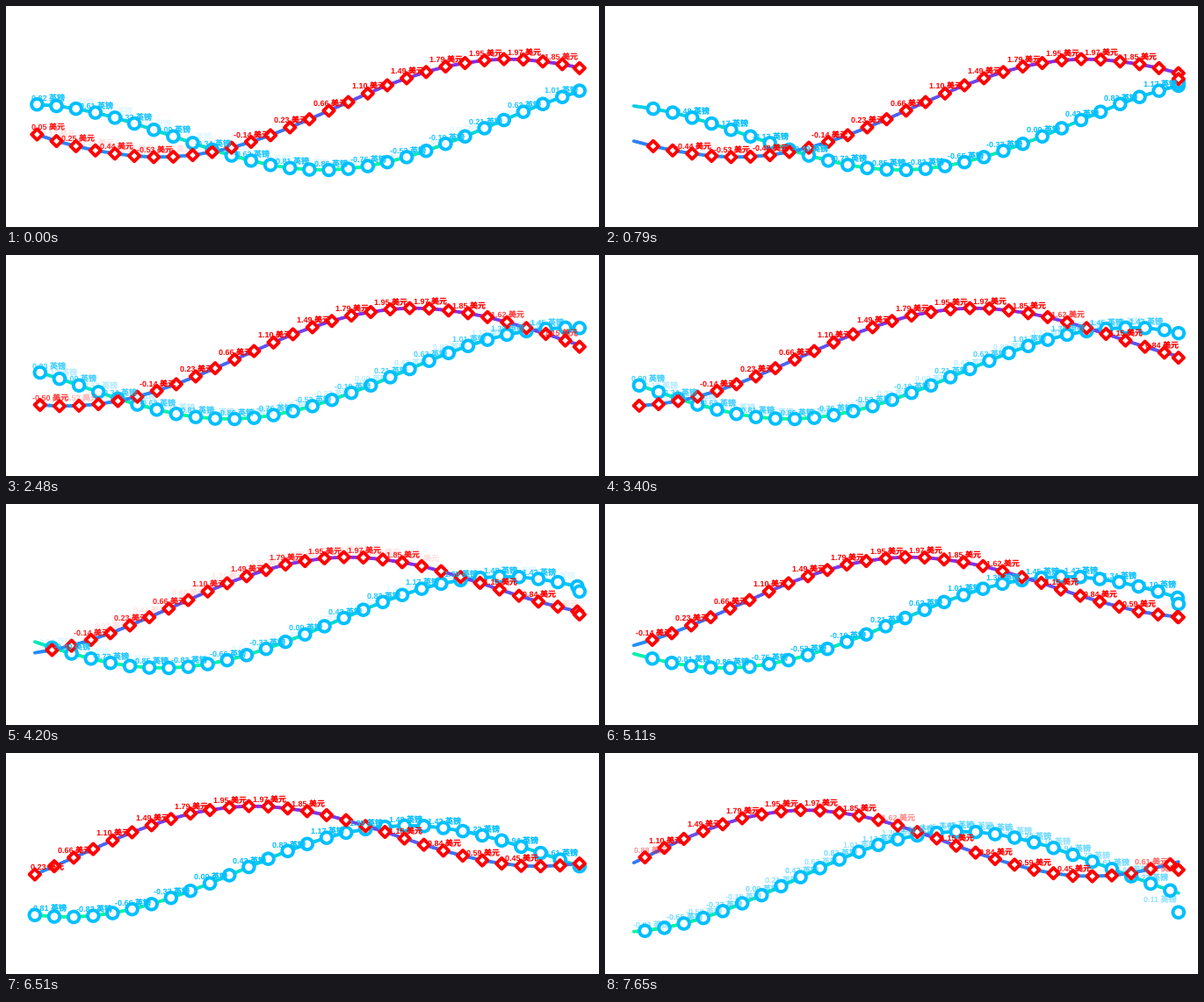
A matplotlib script for the animation above (7.75 s loop, 675 by 252 pixels).

```python
import numpy as np
import matplotlib.pyplot as plt
from matplotlib.animation import FuncAnimation
from matplotlib.collections import LineCollection

plt.rcParams["text.hinting"] = "none"

W, H, DPI = 675, 252, 100
PX = 72 / DPI
LEFT, RIGHT, COUNT = 32.8, 652.8, 29
STEP = (RIGHT - LEFT) / (COUNT - 1)
TICK, LOOP = 25, 7750

# Smooth curves through a few key points; index -1 leaves as the loop begins.
INDEX = np.arange(-1, 45)
KEYS = [0, 3, 7, 11, 15, 19, 23, 27, 32, 36, 40, 42, 44]
POUNDS = [.82, .61, 0, -.62, -.86, -.53, .21, 1.01, 1.48, 1.23, .61, .27, -.03]
DOLLARS = [.05, -.36, -.52, -.14, .66, 1.49, 1.95, 1.85, 1.15, .60, .45, .61, .85]

# Update count over time in ms; one unit is one new data point.
CLOCK = [0, 1420, 2480, 3400, 5110, 6510, 7650]
UPDATES = [-.327, 2.603, 4.593, 6.569, 10.232, 12.97, 15.475]

# The screen stutters regularly, holding a few pictures longer.
STALL_START, STALL_EVERY, STALL, HOLD = 540, 1940, 450, 150
LAST_PICTURE = 7650

# Axis as (zero line, pixels per unit); the last update rescales it.
AXIS, AXIS_END, RESCALE = np.array([148.7, 44.5]), np.array([180., 55.]), 16

LABEL_GAP = 12


def curve(values):
    return np.polynomial.Polynomial.fit(KEYS, values, 9)(INDEX).round(2)


def ease(p):
    return 4 * p ** 3 if p < .5 else 1 - 4 * (1 - p) ** 3


def screen_time(k):
    t = min(k * TICK + 10, LAST_PICTURE)
    since = (t - STALL_START) % STALL_EVERY
    return t - since % HOLD if since < STALL else t


def axis_at(shift):
    return AXIS_END if shift >= RESCALE else AXIS


def to_y(value, axis):
    return axis[0] - axis[1] * value


def label_width(value):
    return 41 if value < 0 else 38


def label_x(i, value, shift):
    """Label centre at rest, kept inside the plot."""
    half = label_width(value) / 2
    x = LEFT + STEP * (i - shift)
    return min(max(x, LEFT - 6 + half), RIGHT + 6 - half)


class Series:
    def __init__(self, ax, values, unit, color, high, low, marker, size, z):
        self.values = curve(values)
        self.high, self.low = np.array(high), np.array(low)
        self.line = LineCollection([], linewidths=3.8 * PX, zorder=z,
                                   capstyle="round")
        ax.add_collection(self.line)
        # One size per dot keeps their positions free of pixel snapping.
        self.dots = ax.scatter(np.zeros(COUNT), np.zeros(COUNT),
                               s=np.full(COUNT, (size * PX) ** 2),
                               marker=marker, facecolor="white",
                               edgecolor=color, linewidth=3.9 * PX,
                               zorder=z + 2)
        self.labels = [
            ax.text(0, 0, f"{v:.2f} {unit}", color=color, ha="center",
                    va="baseline", size=9 * PX, weight="bold", zorder=z + 4,
                    family=["Liberation Sans", "Noto Sans CJK JP"])
            for v in self.values]

    def draw_line(self, pos, axis):
        x = np.linspace(LEFT, RIGHT, 150)
        y = to_y(np.interp(pos + (x - LEFT) / STEP, INDEX, self.values), axis)
        pts = np.column_stack([x, y])
        t = ((y - y.min()) / np.ptp(y))[:-1, None]
        self.line.set_segments(np.stack([pts[:-1], pts[1:]], axis=1))
        self.line.set_color((self.high + (self.low - self.high) * t) / 255)

    def draw_dots(self, pos, axis, target):
        i = np.arange(target, target + COUNT)
        v = self.values[i + 1]
        x, y = LEFT + STEP * (i - pos), to_y(v, axis)
        # The newest point is put straight at its resting place.
        x[-1], y[-1] = RIGHT, to_y(v[-1], axis_at(target))
        self.dots.set_offsets(np.column_stack([x, y]))

    def draw_labels(self, e, axis, target, old, new):
        for i, v, label in zip(INDEX, self.values, self.labels):
            shown = target <= i < target + COUNT and (i in old or i in new)
            label.set_visible(bool(shown))
            if not shown:
                continue
            x, y = label_x(i, v, target), to_y(v, axis)
            if i >= target + COUNT - 2 and i not in old:
                y = to_y(v, axis_at(target))
            else:
                x0 = label_x(i, v, target - 1)
                x = x0 + (x - x0) * e
            label.set_position((x + 1, y - 5.2))
            label.set_alpha((1 - e) * (i in old) + e * (i in new))


fig = plt.figure(figsize=(W / DPI, H / DPI), dpi=DPI, facecolor="white")
ax = fig.add_axes([0, 0, 1, 1])
ax.set(xlim=(0, W), ylim=(H, 0))
ax.axis("off")

chart = [
    Series(ax, POUNDS, "英镑", "#00bfff", (0, 191, 255), (0, 250, 154),
           "o", 12.6, 1),
    Series(ax, DOLLARS, "美元", "#ff0000", (138, 43, 226), (30, 144, 255),
           "D", 8.7, 2),
]


def pick_labels(shift):
    """Keep each label that does not overlap one kept before it."""
    axis, boxes, kept = axis_at(shift), [], []
    for s in chart:
        chosen = set()
        for i in range(shift, shift + COUNT):
            v = s.values[i + 1]
            x, y, w = label_x(i, v, shift), to_y(v, axis), label_width(v)
            if all(abs(x - bx) >= (w + bw) / 2 or abs(y - by) >= LABEL_GAP
                   for bx, by, bw in boxes):
                boxes.append((x, y, w))
                chosen.add(i)
        kept.append(chosen)
    return kept


KEPT = {shift: pick_labels(shift) for shift in range(-1, RESCALE + 1)}


def update(k):
    count = np.interp(screen_time(k), CLOCK, UPDATES)
    start = int(np.floor(count))
    target, e = start + 1, ease(count - start)
    axis = axis_at(start) + (axis_at(target) - axis_at(start)) * e
    for s, old, new in zip(chart, KEPT[start], KEPT[target]):
        s.draw_line(start + e, axis)
        s.draw_dots(start + e, axis, target)
        s.draw_labels(e, axis, target, old, new)
    return []


anim = FuncAnimation(fig, update, frames=LOOP // TICK, interval=TICK,
                     init_func=lambda: update(0), repeat=True, repeat_delay=0)
plt.show()
```
